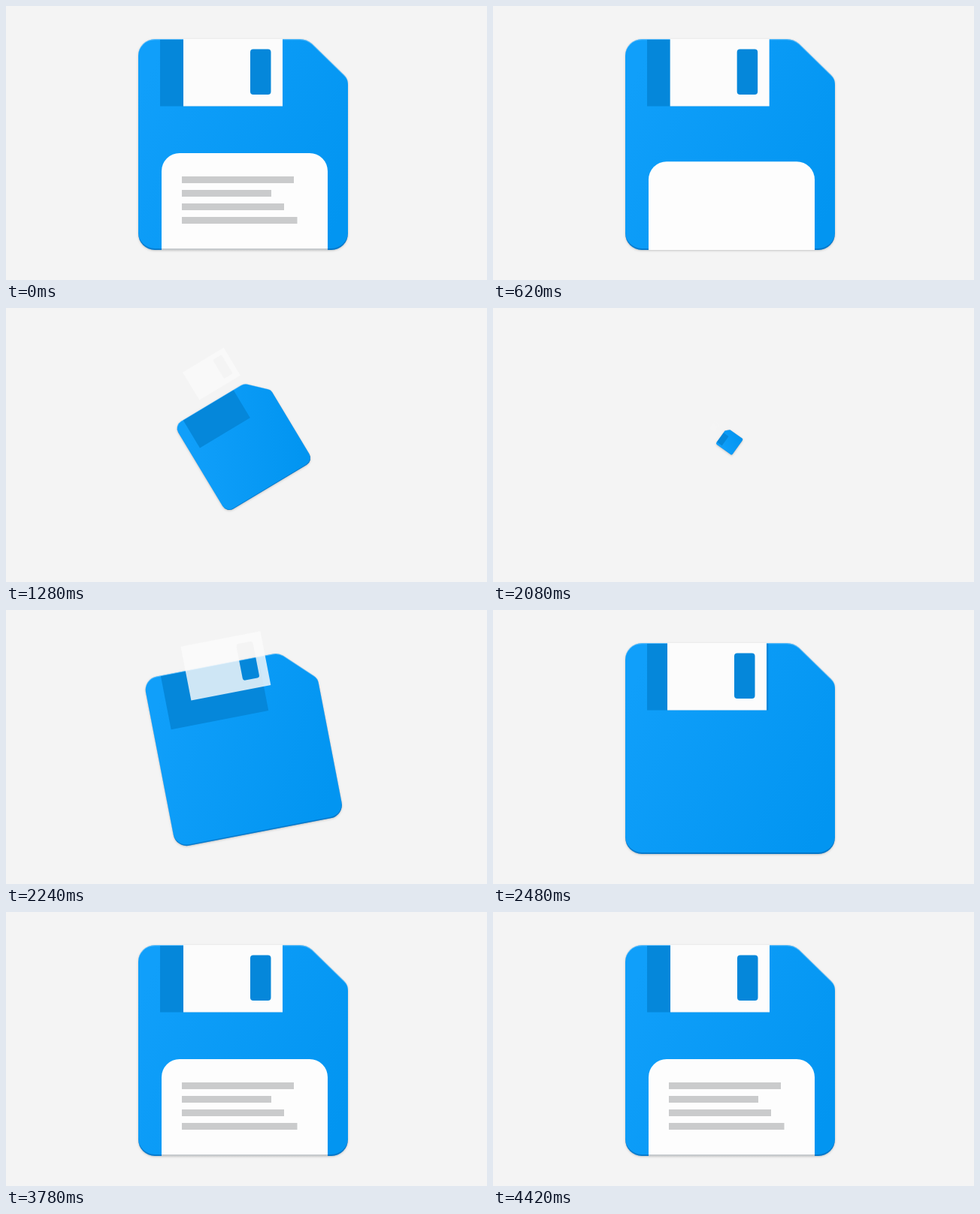
Animation, 640 px wide and 365 px high, one loop 4.44 s. Source, as an HTML page with a canvas:

```html
<!DOCTYPE html>
<html lang="en">
<head>
<meta charset="utf-8">
<title>Floppy disk</title>
<style>
  html, body { margin: 0; width: 100%; height: 100%; overflow: hidden; background: #f4f4f4; }
  canvas { display: block; }
</style>
</head>
<body>
<canvas id="stage" width="640" height="365"></canvas>
<script>
const ctx = document.getElementById('stage').getContext('2d');
const LOOP = 4440;
const PIVOT = [314, 177.5];

const ramp = (t, from, to) => Math.min(1, Math.max(0, (t - from) / (to - from)));
const smooth = u => u * u * (3 - 2 * u);

// Disk outline with a cut top right corner
const disk = new Path2D();
disk.moveTo(198, 44);
disk.lineTo(391, 44);
disk.quadraticCurveTo(400, 44, 407, 50);
disk.lineTo(450, 92);
disk.quadraticCurveTo(455, 97, 455, 104);
disk.arcTo(455, 325, 433, 325, 22);
disk.arcTo(176, 325, 176, 303, 22);
disk.arcTo(176, 44, 198, 44, 22);
disk.closePath();

// The sliver left when the outline is shifted vertically
function rim(dy) {
  const path = new Path2D();
  path.rect(100, 0, 440, 365);
  path.addPath(disk, new DOMMatrix().translate(0, dy));
  return path;
}
const topRim = rim(1.2), bottomRim = rim(-2);

const blue = ctx.createLinearGradient(176, 120, 455, 260);
blue.addColorStop(0, '#109ffa');
blue.addColorStop(1, '#0295f1');

// Metal cover with a slot cut through it
const shutter = new Path2D();
shutter.rect(236, 44, 132, 89.5);
shutter.roundRect(325, 57.5, 27.5, 60.5, 4);

const label = new Path2D();
label.roundRect(207, 196, 221, 129, [24, 24, 0, 0]);

const lineWidths = [149, 119, 136, 153.5];

function fill(path, color) {
  ctx.fillStyle = color;
  ctx.fill(path, 'evenodd');
}

function rect(x, y, w, h, color) {
  ctx.fillStyle = color;
  ctx.fillRect(x, y, w, h);
}

function drawBody() {
  ctx.save();
  ctx.shadowColor = 'rgba(0,0,0,.2)';
  ctx.shadowBlur = 3;
  ctx.shadowOffsetY = 1;
  fill(disk, blue);
  ctx.restore();
  ctx.save();
  ctx.clip(disk);
  fill(topRim, 'rgba(255,255,255,.3)');
  fill(bottomRim, 'rgba(0,50,110,.3)');
  rect(205, 45, 161.5, 88.5, '#0587da');
  ctx.restore();
}

function drawLabel(hidden, t) {
  if (hidden >= 1) return;
  ctx.save();
  ctx.clip(disk);
  ctx.translate(0, 131 * hidden);
  fill(label, '#fdfdfd');
  rect(207, 323, 221, 2, '#c6cacd');
  lineWidths.forEach((w, i) => {
    const out = ramp(t, 100 + 40 * i, 400 + 40 * i);
    const back = ramp(t, 2720 + 40 * i, 3020 + 40 * i);
    const shown = 1 - smooth(out) + smooth(back);
    rect(234, 227 + 18 * i, w * shown, 9, '#cacbcc');
  });
  ctx.restore();
}

function draw(t) {
  // away: 0 = disk at full size, 1 = vanished
  const away = t < 2000 ? ramp(t, 960, 1360) ** 3 : (1 - ramp(t, 2068, 2468)) ** 3;
  const hidden = smooth(ramp(t, 560, 900)) - smooth(ramp(t, 2490, 2830));
  const size = 1 - away;

  rect(0, 0, 640, 365, '#f4f4f4');
  if (size <= 0) return;
  ctx.save();
  ctx.translate(...PIVOT);
  ctx.rotate(-away * Math.PI / 3);
  ctx.scale(size, size);
  ctx.translate(-PIVOT[0], -PIVOT[1]);

  drawBody();
  ctx.save();
  ctx.globalAlpha = size;
  ctx.translate(77 * away - 4 * hidden, -220 * away);
  fill(shutter, '#fcfcfc');
  ctx.restore();
  drawLabel(hidden, t);
  ctx.restore();
}

function frame() {
  draw(performance.now() % LOOP);
  requestAnimationFrame(frame);
}
frame();
</script>
</body>
</html>
```
